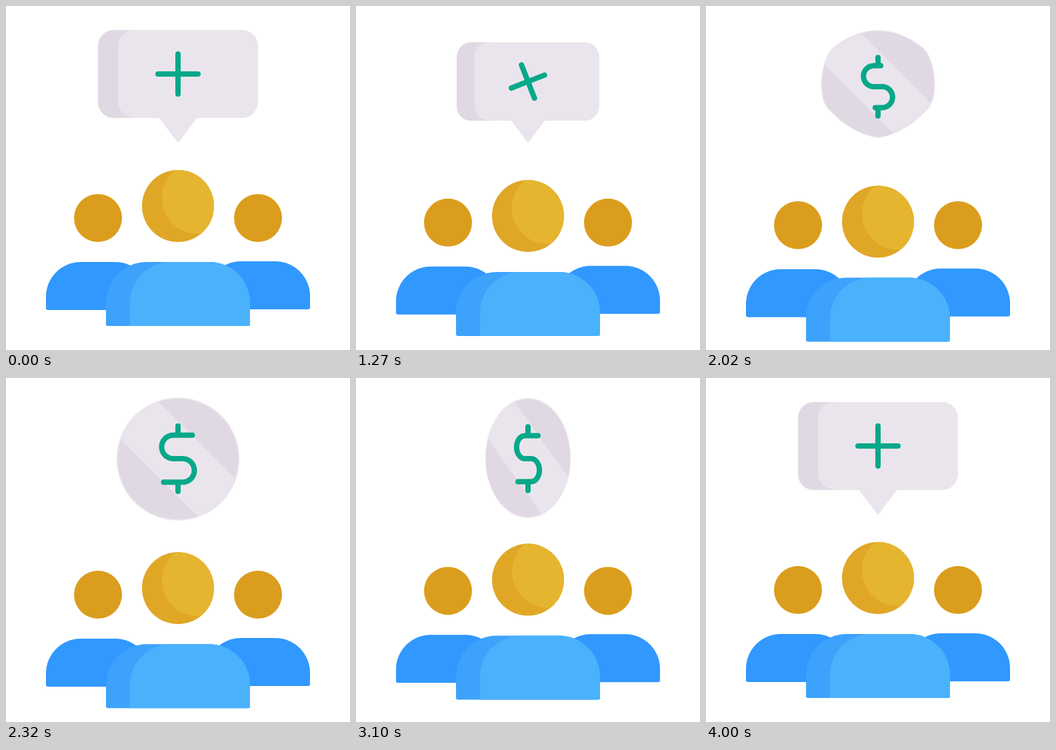
Animation of 516x516 px, one loop 4030 ms. Source, as an HTML page with a canvas:

```html
<!DOCTYPE html>
<html lang="en">
<head>
<meta charset="utf-8">
<title>Team message turning into a coin</title>
<style>
html, body { margin: 0; width: 100%; height: 100%; overflow: hidden; background: #fff; }
canvas { display: block; }
</style>
</head>
<body>
<canvas id="stage" width="516" height="516"></canvas>
<script>
const ctx = document.getElementById('stage').getContext('2d');
const LOOP = 4030, CX = 258, CY = 120, TIP = 205, COIN_R = 94, FLIP = 3355;
const LIGHT = '#eae5ec', SHADE = '#e0d9e3', GREEN = '#07a88a';

const clamp = x => Math.min(1, Math.max(0, x));
const span = (t, a, b) => clamp((t - a) / (b - a));
const smooth = x => x * x * (3 - 2 * x);
const ease = (t, a, b) => smooth(span(t, a, b));
const mix = (a, b, k) => a + (b - a) * k;

// Eased progress with separate weights for leaving and arriving
function bezier(x, x1, x2) {
  let lo = 0, hi = 1;
  for (let i = 0; i < 24; i++) {
    const s = (lo + hi) / 2, r = 1 - s;
    if (3 * s * r * r * x1 + 3 * s * s * r * x2 + s ** 3 < x) lo = s; else hi = s;
  }
  return smooth(lo);
}

function inBubble(x, y) {
  const dx = Math.max(0, Math.abs(x) - 96), dy = Math.max(0, Math.abs(y + 18) - 42);
  const inTail = y > 40 && y < 84.5 && Math.abs(x) < (85.5 - y) * 28 / 37;
  return Math.hypot(dx, dy) < 24 || inTail;
}

// Bubble outline as distances from the coin centre
const RAYS = 720;
const outline = Array.from({ length: RAYS }, (_, i) => {
  const a = i / RAYS * 2 * Math.PI, c = Math.cos(a), s = Math.sin(a);
  let lo = 0, hi = 150;
  for (let k = 0; k < 18; k++) {
    const r = (lo + hi) / 2;
    if (inBubble(r * c, r * s)) lo = r; else hi = r;
  }
  return { c, s, r: lo };
});

function shapePath(q, size = 1) {
  ctx.beginPath();
  for (const { c, s, r } of outline) {
    const d = mix(r, COIN_R, q) * size;
    ctx.lineTo(CX + d * c, CY + d * s);
  }
  ctx.closePath();
}

function circle(x, y, r, color) {
  ctx.fillStyle = color;
  ctx.beginPath();
  ctx.arc(x, y, r, 0, 2 * Math.PI);
  ctx.fill();
}

function torso(x, y, w, h, r, color, foot = 3) {
  ctx.fillStyle = color;
  ctx.beginPath();
  ctx.roundRect(x, y, w, h, [r, r, 3, foot]);
  ctx.fill();
}

function people(t) {
  const dip = t < 1600
    ? bezier(span(t, 1000, 1600), .4, .386)
    : 1 - bezier(span(t, 1600, LOOP), .37, .16);
  const side = 12.2 * dip, mid = 26.6 * dip;

  torso(60, 384 + side, 156, 72, 52, '#3098ff');
  torso(300, 383 + side, 156, 72, 52, '#3098ff');
  circle(138, 318 + side, 36, '#db9d1d');
  circle(378, 318 + side, 36, '#db9d1d');

  torso(150, 384 + mid, 216, 96, 61, '#3da2fc');
  torso(186, 384 + mid, 180, 96, 61, '#4ab1fc', 0);

  ctx.save();
  circle(CX, 300 + mid, 54, '#e0a726');
  ctx.clip();
  circle(288, 288 + mid, 54, '#e6b530');
  ctx.restore();
}

function leftShade() {
  ctx.beginPath();
  ctx.moveTo(192, 0);
  ctx.lineTo(192, 36);
  ctx.arcTo(168, 36, 168, 60, 24);
  ctx.arcTo(168, 167, 192, 167, 24);
  ctx.lineTo(192, 167);
  ctx.lineTo(192, 220);
  ctx.lineTo(100, 220);
  ctx.lineTo(100, 0);
  ctx.fill();
}

function coinStripes() {
  ctx.save();
  ctx.translate(CX, CY);
  ctx.rotate(Math.PI / 4);
  ctx.fillRect(-150, -150, 300, 109);
  ctx.fillRect(-150, 41, 300, 109);
  ctx.restore();
}

// Builds a path in a moved and scaled space, then strokes it at constant weight
function drawSign(x, y, sx, sy, angle, build) {
  ctx.save();
  ctx.translate(x, y);
  ctx.scale(sx, sy);
  ctx.rotate(angle);
  ctx.beginPath();
  build();
  ctx.restore();
  ctx.stroke();
}

function line(x1, y1, x2, y2) {
  ctx.moveTo(x1, y1);
  ctx.lineTo(x2, y2);
}

function plus() {
  line(-30, 0, 30, 0);
  line(0, -30, 0, 30);
}

// Point of the S at a signed distance from its middle
function curveS(d) {
  const side = Math.sign(d), m = Math.abs(d), arcEnd = 7 + 18 * Math.PI;
  if (m < 7) return [d, 0];
  if (m > arcEnd) return [side * (7 - m + arcEnd), side * 36];
  const a = (m - 7) / 18;
  return [side * (7 + 18 * Math.sin(a)), side * (18 - 18 * Math.cos(a))];
}

function dollar(shown) {
  for (let i = -60; i <= 60; i++) {
    const [x, y] = curveS(i / 60 * 92.5 * shown);
    if (i === -60) ctx.moveTo(x, y); else ctx.lineTo(x, y);
  }
  const tick = 50 - 14 * clamp(shown * 2);
  line(0, -50, 0, -tick);
  line(0, 50, 0, tick);
}

function message(t) {
  const back = t >= FLIP;
  const q = back ? 0 : ease(t, 1300, 2250);
  const size = back ? 1
    : 1 - .15 * ease(t, 960, 1430) + .15 * ease(t, 1880, 2450);
  const rise = t < 1565 ? ease(t, 1270, 1565) : 1 - ease(t, 1565, 2350);
  const turn = span(t, 2600, FLIP) ** 2.8;
  const sx = back ? 1 - (1 - span(t, FLIP, 4000)) ** 2.8 : size * (1 - turn);
  const sy = back ? 1 : size * (1 - .137 * turn);
  const pivot = t > 2500 && !back ? CY : TIP;
  const lift = -36 * rise;
  if (sx < .002) return;

  ctx.save();
  ctx.translate(CX, pivot + lift);
  ctx.scale(sx, sy);
  ctx.translate(-CX, -pivot);
  shapePath(q);
  ctx.fillStyle = LIGHT;
  ctx.fill();
  shapePath(q, 1 - .02 * q);
  ctx.clip();
  ctx.fillStyle = SHADE;
  ctx.globalAlpha = clamp(1 - q * 2);
  leftShade();
  ctx.globalAlpha = clamp(q * 2 - .5);
  coinStripes();
  ctx.restore();

  ctx.strokeStyle = GREEN;
  ctx.lineWidth = 8;
  ctx.lineCap = ctx.lineJoin = 'round';
  const plusSize = back ? 1 : 1 - ease(t, 1290, 1650);
  if (plusSize > .01) {
    const angle = back ? 0 : -80 * ease(t, 1000, 1800) * Math.PI / 180;
    const y = pivot + lift + (102 - pivot) * sy;
    drawSign(CX, y, sx * plusSize, sy * plusSize, angle, plus);
  }
  const shown = back ? 0 : ease(t, 1550, 2200);
  if (shown > .01) drawSign(CX, 121, sx, sy, 0, () => dollar(shown));
}

function draw(now) {
  const t = now % LOOP;
  ctx.clearRect(0, 0, 516, 516);
  people(t < 1030 ? 0 : t);
  message(t < 1030 ? 0 : t);
}

const start = performance.now();
function frame() {
  draw(performance.now() - start);
  requestAnimationFrame(frame);
}
frame();
</script>
</body>
</html>
```
